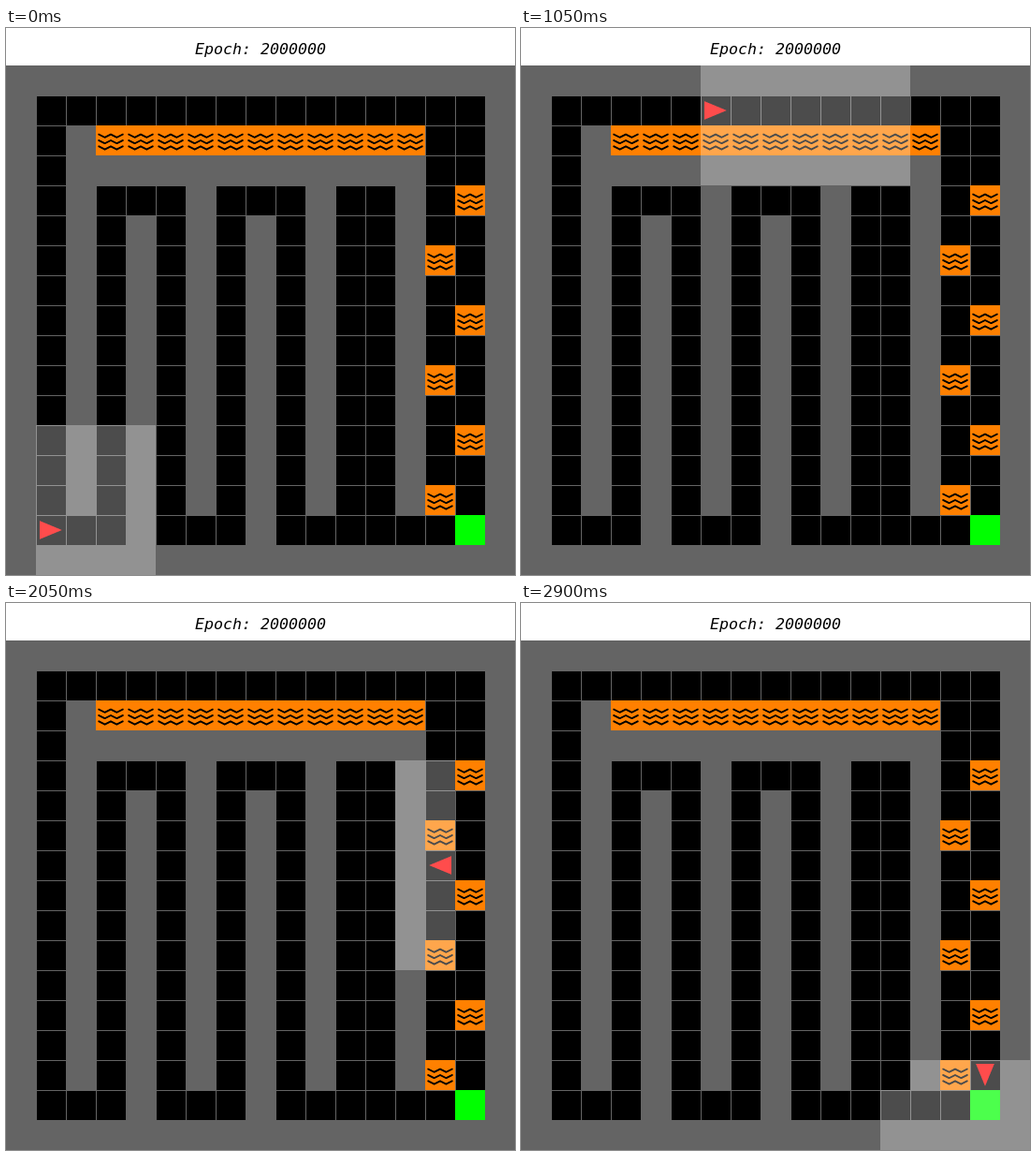
These frames come from a looping animation (544x584 px, 2.95 s). An HTML page with a canvas:

```html
<!DOCTYPE html>
<html lang="en">
<head>
<meta charset="utf-8">
<title>Grid maze run</title>
<style>
  html, body { margin: 0; width: 544px; height: 584px; overflow: hidden; background: #fff; }
  canvas { display: block; }
</style>
</head>
<body>
<canvas id="stage" width="544" height="584"></canvas>
<script>
const ctx = document.getElementById('stage').getContext('2d');
const SIZE = 17, TILE = 32, TOP = 40, SUB = 3, VIEW = 7, STEP = 50;
const BLACK = [0, 0, 0], GREY = [100, 100, 100], ORANGE = [255, 128, 0],
      GREEN = [0, 255, 0], RED = [255, 0, 0];

// Maze: '#' wall, '~' lava, 'G' goal
const aisle = '#.#.#.#.#.#..#..#';
const maze = [
  '#'.repeat(17),
  '#...............#',
  '#.#~~~~~~~~~~~..#',
  '#.############..#',
  '#.#...#...#..#..#',
  ...Array(10).fill(aisle),
  '#...#...#......G#',
  '#'.repeat(17)
].map(row => [...row]);
for (let y = 4; y <= 14; y += 2) maze[y][y % 4 ? 14 : 15] = '~';

const cellAt = (x, y) => (maze[y] && maze[y][x]) || '#';

// Shapes in unit tile coordinates
function nearLine(px, py, x0, y0, x1, y1, r) {
  const dx = x1 - x0, dy = y1 - y0;
  const k = ((px - x0) * dx + (py - y0) * dy) / (dx * dx + dy * dy);
  const t = Math.min(1, Math.max(0, k));
  return Math.hypot(px - x0 - t * dx, py - y0 - t * dy) <= r;
}

function inWave(x, y) {
  for (let row = 0; row < 3; row++) {
    const lo = 0.3 + 0.2 * row, hi = lo + 0.1;
    for (let k = 0; k < 4; k++) {
      const x0 = 0.1 + 0.2 * k;
      const [a, b] = k % 2 ? [hi, lo] : [lo, hi];
      if (nearLine(x, y, x0, a, x0 + 0.2, b, 0.03)) return true;
    }
  }
  return false;
}

function inArrow(x, y, dir) {
  let u = x - 0.5, v = y - 0.5;
  for (let k = 0; k < dir; k++) [u, v] = [v, -u];
  const t = (u + 0.38) / 0.75;
  return t >= 0 && t <= 1 && Math.abs(v) <= 0.31 * (1 - t);
}

function colourAt(x, y, type, dir) {
  if (type === '#') return GREY;
  if (type === 'G') return GREEN;
  if (type === '~') return inWave(x, y) ? BLACK : ORANGE;
  if (dir >= 0 && inArrow(x, y, dir)) return RED;
  return x <= 0.031 || y <= 0.031 ? GREY : BLACK;
}

// Supersampled tiles, cached by look
const cache = {};
function tile(type, dir, lit) {
  const key = type + dir + lit;
  if (cache[key]) return cache[key];
  const img = ctx.createImageData(TILE, TILE);
  const n = TILE * SUB;
  for (let y = 0; y < TILE; y++) {
    for (let x = 0; x < TILE; x++) {
      const sum = [0, 0, 0];
      for (let s = 0; s < SUB * SUB; s++) {
        const sx = (x * SUB + s % SUB + 0.5) / n;
        const sy = (y * SUB + Math.floor(s / SUB) + 0.5) / n;
        colourAt(sx, sy, type, dir).forEach((c, i) => {
          sum[i] += lit ? Math.floor(c + 0.3 * (255 - c)) : c;
        });
      }
      const p = (y * TILE + x) * 4;
      sum.forEach((c, i) => { img.data[p + i] = Math.floor(c / (SUB * SUB)); });
      img.data[p + 3] = 255;
    }
  }
  return cache[key] = img;
}

// Directions: 0 right, 1 down, 2 left, 3 up
const DX = [1, 0, -1, 0], DY = [0, 1, 0, -1];
const weave = 'LFRFFRFLFF';
const moves = 'L' + 'F'.repeat(14) + 'R' + 'F'.repeat(13) + 'RFFFF' + weave + weave + 'LFRF';

const poses = [{ x: 1, y: 15, dir: 0 }];
for (const m of moves) {
  const p = { ...poses[poses.length - 1] };
  if (m === 'F') { p.x += DX[p.dir]; p.y += DY[p.dir]; }
  else p.dir = (p.dir + (m === 'R' ? 1 : 3)) % 4;
  poses.push(p);
}

// Cells the agent sees: light spreads forward row by row, walls stop it
function visible({ x, y, dir }) {
  const fx = DX[dir], fy = DY[dir], rx = -fy, ry = fx, half = (VIEW - 1) / 2;
  const world = (i, j) => [x + fx * j + rx * (i - half), y + fy * j + ry * (i - half)];
  const seen = Array.from({ length: VIEW + 1 }, () => Array(VIEW).fill(false));
  seen[0][half] = true;
  const spread = (i, j, d) => {
    if (!seen[j][i] || cellAt(...world(i, j)) === '#') return;
    seen[j][i + d] = seen[j + 1][i + d] = seen[j + 1][i] = true;
  };
  const lit = new Set();
  for (let j = 0; j < VIEW; j++) {
    for (let i = 0; i < VIEW - 1; i++) spread(i, j, 1);
    for (let i = VIEW - 1; i > 0; i--) spread(i, j, -1);
    for (let i = 0; i < VIEW; i++) if (seen[j][i]) lit.add(String(world(i, j)));
  }
  return lit;
}

function draw(pose) {
  ctx.fillStyle = '#fff';
  ctx.fillRect(0, 0, 544, TOP);
  ctx.fillStyle = '#000';
  ctx.font = 'italic 16.61px "DejaVu Sans Mono", monospace';
  ctx.textAlign = 'center';
  ctx.fillText('Epoch: 2000000', 272, 28);
  const lit = visible(pose);
  for (let y = 0; y < SIZE; y++) {
    for (let x = 0; x < SIZE; x++) {
      const dir = x === pose.x && y === pose.y ? pose.dir : -1;
      ctx.putImageData(tile(maze[y][x], dir, lit.has(x + ',' + y)), x * TILE, TOP + y * TILE);
    }
  }
}

let shown = -1;
const start = performance.now();
function tick() {
  const t = Math.max(0, performance.now() - start);
  const k = Math.floor(t / STEP) % poses.length;
  if (k !== shown) draw(poses[shown = k]);
  requestAnimationFrame(tick);
}
tick();
</script>
</body>
</html>
```
